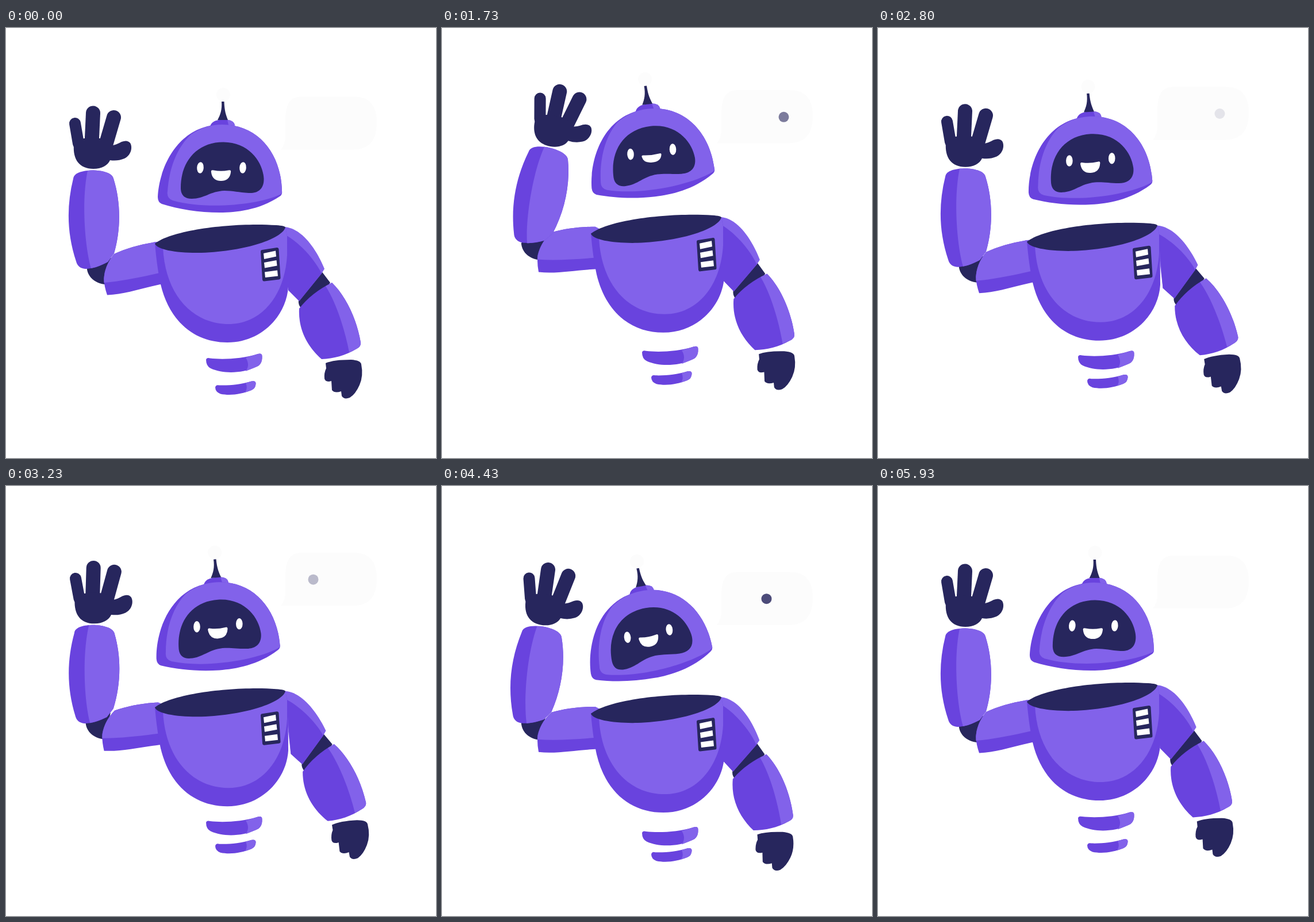
An HTML page that plays this animation: 748 px wide and 748 px high, repeating every 6.01 s.

```html
<!DOCTYPE html>
<html lang="en">
<head>
<meta charset="utf-8">
<title>Waving robot</title>
<style>
html, body { margin: 0; width: 100%; height: 100%; overflow: hidden; background: #fff }
svg { display: block; width: 100%; height: 100% }
.light { fill: #8262ea }
.dark { fill: #6943de }
.navy { fill: #27265d }
.white { fill: #fff }
.faint { fill: #fcfcfc }
.finger { stroke: #27265d; stroke-linecap: round }
</style>
</head>
<body>
<svg viewBox="0 0 748 748">
  <g id="bubble">
    <path class="faint" d="M512 121H606C635 121 645 140 645 165C645 200 630 212 605 213H478Q487 203 486 185V160Q486 121 512 121Z"/>
    <g id="dots" class="navy">
      <circle cx="534.5" cy="167.5" r="9"/>
      <circle cx="564.5" cy="167.5" r="9"/>
      <circle cx="594.5" cy="167.5" r="9"/>
    </g>
  </g>

  <g id="body">
    <g id="ring1">
      <path class="dark" d="M348 577Q349 573 355 574.5C375 577 410 576 438 567Q446 565 445.5 572Q446 586 434 590C410 601 378 602 356 592Q348 588 348 577Z"/>
      <path class="light" d="M417 573.5L438 567Q446 565 445.5 572Q446 586 434 590L417 597Q425 586 417 573.5Z"/>
    </g>
    <g id="ring2">
      <path class="dark" d="M364 625Q365 620 371 621.5C390 622 408 620 427 614.5Q435 613 434.5 619Q434 627 427 630C410 637 390 640 373 636.5Q364 633 364 625Z"/>
      <path class="light" d="M417 617.5L427 614.5Q435 613 434.5 619Q434 627 427 630L416 634Q421 626 417 617.5Z"/>
    </g>

    <g id="waveArm">
      <path id="elbow" class="navy" d="M140.5 417C142 434 156 445 174 446L184 400L150 405Z"/>
      <path class="dark" d="M188 393C210 383 235 376 262 372L285 380V443C245 449 212 463 176 464.5Q171 450 170 436Q172 413 188 393Z"/>
      <path class="light" d="M188 393C210 383 235 376 262 372L285 380V422C245 431 208 440 170.5 443Q169 416 188 393Z"/>
      <g id="forearm">
        <path class="dark" d="M117 262C118 251 136 247.5 152 247.5C168 248 185 252 187 262C200 303 200 350 188 392L177 407C165 414 150 419 138 419Q125 418 122 406C106 358 105 310 117 262Z"/>
        <path class="light" d="M142 248Q148 247.5 152 247.5C168 248 185 252 187 262C200 303 200 350 188 392L177 407C167 412 158 416 148 418C137 380 131 300 142 248Z"/>
        <g id="hand" class="navy">
          <path class="finger" stroke-width="20" d="M120 166L126 201"/>
          <path class="finger" stroke-width="25" d="M151.5 148L149 202"/>
          <path class="finger" stroke-width="25" d="M187.5 155.5L173 205"/>
          <path d="M118 203C116 229 128 245 152 245C166 245 177 239 181 230Q194 232 206 227C217 222 221 208 216 200Q211 194 201 198Q192 203 186 204L184 198Q150 184 120 197Z"/>
        </g>
      </g>
    </g>

    <g id="restArm">
      <path class="navy" d="M545 418L564 443L548 465L514 488Q508 482 509 474L520 455Z"/>
      <path class="light" d="M484 346C515 348 540 385 554 419L549 427L510 475L491 456Z"/>
      <path class="dark" d="M488 361C515 377 538 405 549 427L510 475L491 456Z"/>
      <path class="dark" d="M567 443C590 465 610 505 617 547Q618 554 610 558C590 570 570 575 549 576C525 555 508 525 510 488Q532 460 567 443Z"/>
      <path class="light" d="M567 443C590 465 610 505 617 547Q618 554 610 558L597 564C589 523 574 477 556 449Z"/>
      <path class="navy" d="M556 583Q570 577 600 577Q617 578 618 585Q622 605 615 621Q608 637 598 643Q588 647 584 640L583 632Q572 636 567 630L566 614Q556 617 554 610Q553 600 557 592Z"/>
    </g>

    <path class="dark" d="M259 374C261 400 265 428 269 446C285 513 330 547 385 547C445 547 488 500 491 450Q491 400 489 362L486 347Z"/>
    <path class="light" d="M273 382C277 465 325 515 387 515C445 515 485 465 489 395V362L486 347Z"/>
    <path class="navy" d="M259 375C290 350 400 338 470 343Q486 344 486 347C480 366 420 388 340 391C300 392 262 386 259 375Z"/>
    <path class="navy" stroke="#27265d" stroke-width="6" stroke-linejoin="round" d="M446 389L471.5 385L474.5 434.5L449 437.5Z"/>
    <path class="white" d="M448 392L469 387.5L470 397.5L449 402ZM449 408L470.5 404L471.5 413.5L450 417.5ZM450 424.5L472 421.5L473 431.5L451 434Z"/>

    <g id="head">
      <circle class="faint" cx="378" cy="116" r="12"/>
      <path class="dark" d="M354 176Q355 162 370 160Q396 157 398 169V176Z"/>
      <path class="light" d="M385 159.5Q397 161 398 169V173H388Z"/>
      <path class="navy" d="M375 128H379.5C380 145 383 152 386 160H368C373 151 376 142 375 128Z"/>
      <path class="dark" d="M264 294C266 245 298 168 376 168C440 168 479 220 480 284Q481 290 476 293C440 317 400 321 372 321C335 321 300 315 271 306Q264 303 264 294Z"/>
      <path class="light" d="M322 185Q347 168 376 168C440 168 479 220 480 284Q481 288 476 290C440 307 350 317 290 300Q279 296 281 284C284 240 300 205 322 185Z"/>
      <path class="navy" d="M304 280C303 235 330 198.5 378 198.5C425 199 447 235 448.5 262C449 280 438 288 422 287C405 286 395 283 380 283C355 284 345 297 323 297Q305 297 304 280Z"/>
      <ellipse class="white" cx="338" cy="243" rx="5.8" ry="9.8" transform="rotate(4 338 243)"/>
      <ellipse class="white" cx="412" cy="243" rx="5.8" ry="9.8" transform="rotate(4 412 243)"/>
      <path id="mouth" class="white" d="M357 251Q356 246 361 247.5Q374 250 387 247.5Q392 246 391 251Q389 266 374 266Q359 266 357 251Z"/>
    </g>
  </g>
</svg>
<script>
const LOOP = 6010, WAVE = 2.8;
const { sin, PI, floor, min, max, abs } = Math;
const el = id => document.getElementById(id);
const pose = (id, transform) => el(id).setAttribute('transform', transform);
const shift = (id, y) => pose(id, `translate(0 ${y})`);

function ease(t, from, to) {
  const u = max(0, min(1, (t - from) / (to - from)));
  return u * u * (3 - 2 * u);
}
// Rises from 0 to 1 over a..b and falls back over c..d.
const hold = (t, a, b, c, d) => ease(t, a, b) - ease(t, c, d);

// Eases round a ring of values, one every `step` seconds.
function cycle(t, step, ...values) {
  const i = floor(t / step), from = values[i % values.length], to = values[(i + 1) % values.length];
  return from + (to - from) * ease(t / step, i, i + 1);
}

function drawWave(t) {
  const raise = hold(t, .2, .6, 2.03, 2.33);
  // One and a half swings, reaching a little further to the left.
  const s = t > 1.28 && t < 2.18 ? sin(2 * PI * (t - 1.28) / .6) : 0;
  const swing = -13 * s - 3 * s * s;
  const upper = 8.4 * raise, fore = 2.2 * raise + swing, hand = 1.15 * swing - 1.5 * raise;
  pose('waveArm', `rotate(${upper} 327 399)`);
  pose('elbow', `rotate(${-upper} 155 430)`);
  pose('forearm', `rotate(${fore - upper} 155 430)`);
  pose('hand', `rotate(${hand - fore} 152 246)`);
}

function draw(ms) {
  // Two steps per tenth of a second, 30 ms and 70 ms long.
  const t = min(floor(ms / 100) / 10 + (ms % 100 >= 30 ? 1 / 30 : 0), 5.934);
  const sway = sin(PI * t / 2);
  const bob = cycle(t, 2, 0, -18, 24);

  shift('body', bob);
  shift('bubble', bob + 14.5 * sway - 1.5);
  shift('ring1', 4.5 * sway + 2.5 * hold(t, 0, 1, 5, 6));
  shift('ring2', -9 * hold(t, 2, 3, 4, 5));
  pose('restArm', `rotate(${3.2 * sway} 490 370)`);

  const lift = -11 * hold(t, .4, 1, 4, 5.5);
  const nod = cycle(t, 1, 0, 0, -8, -2.8, -11, -9.4);
  pose('head', `translate(0 ${lift}) rotate(${nod} 374 332)`);
  const smile = 1 - .25 * hold(t, 1.3, 1.7, 1.8, 2.2);
  pose('mouth', `translate(0 248) scale(1 ${smile}) translate(0 -248)`);

  drawWave(t < 2 * WAVE ? t % WAVE : 0);

  // The dots blink one after another, once a second.
  [...el('dots').children].forEach((dot, i) =>
    dot.setAttribute('opacity', max(0, 1 - abs(t % 1 - .14 - .27 * i) / .135)));
}

let start;
function tick(now) {
  start ??= now;
  draw((now - start) % LOOP);
  requestAnimationFrame(tick);
}
draw(0);
requestAnimationFrame(tick);
</script>
</body>
</html>
```
